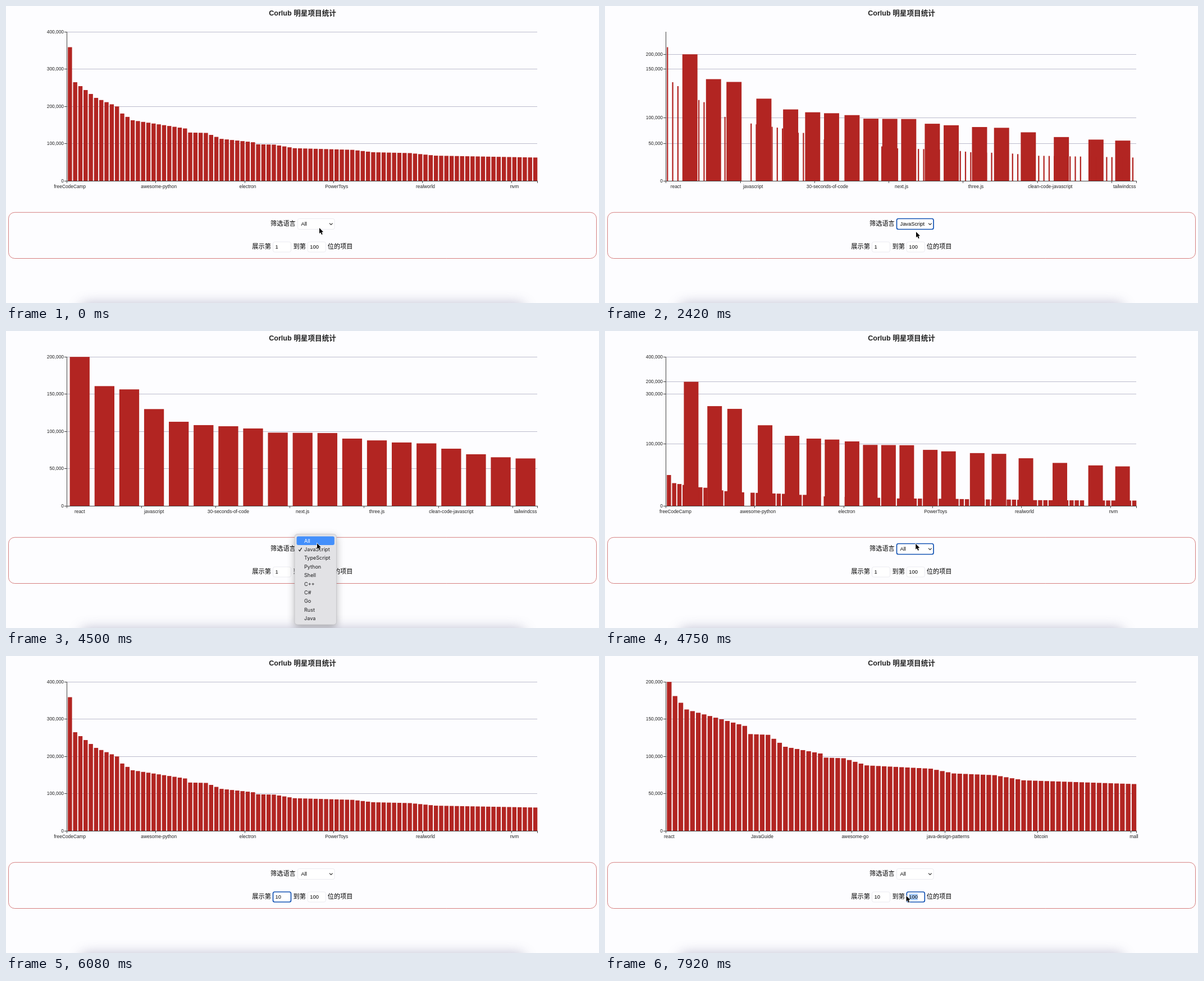
An HTML page with a canvas for the animation above (8000 ms loop, 1056x530 px).

```html
<!DOCTYPE html>
<html lang="zh-CN">
<head>
<meta charset="utf-8">
<style>
  html, body { margin: 0; width: 100%; height: 100%; overflow: hidden; background: #fdfdff; }
  canvas { display: block; }
</style>
</head>
<body>
<canvas id="stage" width="1056" height="530"></canvas>
<script>
const ctx = document.getElementById('stage').getContext('2d');
const LOOP = 8000, LEFT = 109.2, RIGHT = 947.2, TOP = 46.2, BASE = 312.3;
const RED = '#b22522', INK = '#222', AXIS = '#444';
const SANS = '"Liberation Sans", "Noto Sans CJK SC", "Noto Sans CJK", sans-serif';
const CHART_FONT = '8.4px ' + SANS, FORM_FONT = '500 11.2px ' + SANS;
const FIELD_FONT = '9.33px ' + SANS, MENU_FONT = '9.1px Inter, sans-serif';

const clamp = v => Math.max(0, Math.min(1, v));
const lerp = (a, b, p) => a + (b - a) * p;
const cubicOut = p => 1 - (1 - clamp(p)) ** 3;
const expoOut = p => p >= 1 ? 1 : 1 - 2 ** (-10 * clamp(p));
const smooth = p => p * p * (3 - 2 * p);
const within = (t, a, b) => t >= a && t < b;

// Bends of the popularity curve: rank, stars in thousands
const bends = [[0, 359], [1, 265], [5, 223], [9, 200], [10, 181], [12, 163], [22, 141], [23, 130],
  [26, 129], [29, 113], [35, 104], [36, 98.4], [39, 97.6], [43, 88], [54, 83.6], [58, 77.2],
  [65, 74.9], [70, 68], [89, 63]];

function starsAt(rank) {
  const i = bends.findIndex(b => b[0] >= rank);
  if (!i) return bends[0][1];
  const [[r0, s0], [r1, s1]] = bends.slice(i - 1);
  return lerp(s0, s1, (rank - r0) / (r1 - r0));
}

const everyId = Array.from({ length: 90 }, (_, i) => i);
const jsIds = [9, 13, 15, 23, 29, 32, 33, 35, 36, 37, 38, 42, 43, 50, 53, 59, 69, 80, 86];

const all = { ids: everyId, max: 400, every: 17,
  names: ['freeCodeCamp', 'awesome-python', 'electron', 'PowerToys', 'realworld', 'nvm'] };
const js = { ids: jsIds, max: 200, every: 3,
  names: ['react', 'javascript', '30-seconds-of-code', 'next.js', 'three.js', 'clean-code-javascript', 'tailwindcss'] };
const fromTen = { ids: everyId.slice(9), max: 200, every: 16,
  names: ['react', 'JavaGuide', 'awesome-go', 'java-design-patterns', 'bitcoin', 'mall'] };
const views = [
  { start: -LOOP, data: all }, { start: 2322, data: js },
  { start: 4713, data: all }, { start: 6420, data: fromTen }];

const languages = ['All', 'JavaScript', 'TypeScript', 'Python', 'Shell', 'C++', 'C#', 'Go', 'Rust', 'Java'];
const menus = [
  { open: 330, click: 2080, close: 2320, top: 378, height: 149.5, checked: 0, target: 1, scrolls: true },
  { open: 3420, click: 4330, close: 4700, top: 362.5, height: 161.5, checked: 1, target: 0 }];

// Pointer moves: start, duration, x, y
const moves = [
  [1450, 300, 554, 403], [2770, 150, 554, 391], [3690, 310, 554, 379], [4720, 430, 503, 432],
  [6750, 200, 530, 444], [6950, 250, 560, 431], [7310, 270, 541, 431], [7700, 210, 536.5, 428]];

function pointerAt(t) {
  let x = 558, y = 396;
  for (const [start, duration, toX, toY] of moves) {
    const p = smooth(clamp((t - start) / duration));
    x = lerp(x, toX, p);
    y = lerp(y, toY, p);
  }
  return { x, y };
}

function text(str, x, y, font, color = '#000', align = 'left') {
  ctx.font = font;
  ctx.fillStyle = color;
  ctx.textAlign = align;
  ctx.textBaseline = 'middle';
  ctx.fillText(str, x, y);
}

function box(x, y, w, h, r, fill, stroke, width = 1) {
  ctx.beginPath();
  ctx.roundRect(x, y, w, h, r);
  if (fill) { ctx.fillStyle = fill; ctx.fill(); }
  if (stroke) { ctx.strokeStyle = stroke; ctx.lineWidth = width; ctx.stroke(); }
}

function line(points, color, width) {
  ctx.beginPath();
  points.forEach(([x, y]) => ctx.lineTo(x, y));
  ctx.strokeStyle = color;
  ctx.lineWidth = width;
  ctx.stroke();
}

const chevron = (x, y, size, color) =>
  line([[x - size, y - size / 2], [x, y + size / 2], [x + size, y - size / 2]], color, 1.2);

function rule(x, y, w, h, color) {
  ctx.fillStyle = color;
  ctx.fillRect(Math.floor(x - 0.5), Math.floor(y), w, h);
}

const band = data => (RIGHT - LEFT) / data.ids.length;
const valueY = (v, data) => lerp(BASE, TOP, v / data.max);

function barOf(data, id) {
  const i = data.ids.indexOf(id), step = band(data);
  return i < 0 ? null : { x: LEFT + step * (i + 0.1), w: step * 0.8, h: BASE - valueY(starsAt(id), data) };
}

function drawChart(t) {
  const n = views.findLastIndex(v => v.start <= t);
  const { start, data } = views[n], prev = views[n - 1]?.data;
  const move = cubicOut((t - start) / 300), grow = expoOut((t - start) / 1000);

  for (let k = 0; k <= 4; k++) {
    const v = data.max / 4 * k;
    const kept = prev && v <= prev.max && v % (prev.max / 4) === 0;
    const y = lerp(valueY(v, kept ? prev : data), valueY(v, data), move);
    if (k) rule(LEFT, y, RIGHT - LEFT, 1, '#bcbccd');
    rule(105, y, 4, 1, AXIS);
    text((v * 1000).toLocaleString('en-US'), 103, y, CHART_FONT, INK, 'right');
  }

  // Kept bars travel, new ones rise, dropped ones narrow to nothing
  ctx.fillStyle = RED;
  for (const id of everyId) {
    const a = prev && barOf(prev, id), b = barOf(data, id);
    if (!a && !b) continue;
    let { x, w, h } = b || a;
    if (a && b) {
      x = lerp(a.x, x, move);
      w = lerp(a.w, w, move);
      h = lerp(a.h, h, move);
    } else if (b) h *= grow;
    else w *= 1 - move;
    ctx.fillRect(x, BASE - h, w, h);
  }

  rule(LEFT, TOP, 1, BASE - TOP, AXIS);
  rule(LEFT, BASE, RIGHT - LEFT, 1, AXIS);
  rule(RIGHT, BASE, 1, 4, AXIS);
  data.names.forEach((name, i) => {
    const tick = LEFT + band(data) * data.every * i;
    const from = band(i || !prev ? data : prev);
    rule(tick, BASE, 1, 4, AXIS);
    text(name, tick + lerp(from, band(data), move) / 2, 322.3, CHART_FONT, INK, 'center');
  });
}

function field(x, y, w, h, focused) {
  box(x, y, w, h, 3, '#fff', focused ? '#1554b4' : '#e6e6ec', focused ? 1.7 : 0.8);
}

function drawForm(t, pointer) {
  box(4.5, 368.3, 1047, 82.2, 11, null, 'rgba(186,40,38,.66)', 0.9);
  text('筛选语言', 471, 388.5, FORM_FONT);
  text('展示第', 438.3, 429.5, FORM_FONT);
  text('到第', 511.5, 429.5, FORM_FONT);
  text('位的项目', 572.8, 429.5, FORM_FONT);

  field(519.5, 379.5, 65.5, 19, within(t, 2250, 5650));
  text(within(t, 2250, 4650) ? 'JavaScript' : 'All', 525.5, 389.5, FIELD_FONT);
  chevron(578.8, 389.1, 2.8, '#333');

  field(475.5, 421, 32, 18, within(t, 5650, 7250));
  text(t < 6000 ? '1' : '10', 479.5, 430.5, FIELD_FONT);

  field(537.3, 421, 32, 18, t >= 7250);
  const digit = 5.2, selected = t < 7310 ? 0 : Math.min(3, Math.round((557 - pointer.x) / digit));
  if (selected > 0) box(556.9 - selected * digit, 424, selected * digit, 12, 0, '#acd0fa');
  text('100', 541.3, 430.5, FIELD_FONT);
}

function drawMenu(t, pointer) {
  const menu = menus.find(m => within(t, m.open, m.close));
  if (!menu) return;
  const { top, height, scrolls, click } = menu, row = 15.4;
  const hover = Math.max(0, Math.floor((pointer.y - top - 4) / row));
  const lit = t < click ? hover : t < click + 85 ? -1 : menu.target;

  ctx.save();
  ctx.globalAlpha = clamp((menu.close - t) / 90);
  ctx.shadowColor = 'rgba(0,0,0,.3)';
  ctx.shadowBlur = 14;
  ctx.shadowOffsetY = 4;
  box(514, top, 74.5, height, 5, '#e2e2e5');
  ctx.shadowColor = 'transparent';
  box(514, top, 74.5, height, 5, null, '#bcbcc0', 0.6);

  ctx.save();
  ctx.beginPath();
  ctx.rect(514, top, 75, height - (scrolls ? 14 : 0));
  ctx.clip();
  languages.forEach((name, i) => {
    const y = top + 12 + i * row, color = i === lit ? '#fff' : '#1c1c1e';
    if (i === lit) box(517.5, y - 8, 67.3, 15.5, 3, '#438ffb');
    if (i === menu.checked) line([[521.2, y + 0.5], [523, y + 2.8], [526.6, y - 3]], color, 1.2);
    text(name, 531, y + 0.3, MENU_FONT, color);
  });
  ctx.restore();
  if (scrolls) chevron(550.3, top + height - 8, 3, INK);
  ctx.restore();
}

function drawPointer(t, { x, y }) {
  if (within(t, 6000, 6750)) return; // hidden while typing
  const overField = within(y, 421, 439) && (within(x, 475, 508) || within(x, 538, 570));
  ctx.save();
  ctx.translate(x, y);
  if (overField) {
    line([[0, -4.5], [0, 4.5]], INK, 1);
    for (const s of [-1, 1]) line([[-2.2, 5.6 * s], [0, 4.4 * s], [2.2, 5.6 * s]], INK, 1);
  } else {
    const arrow = new Path2D('M0 0V10L2.3 8 4 12 5.7 11.3 4.1 7.4 7.1 7.2Z');
    ctx.lineWidth = 1.3;
    ctx.strokeStyle = '#fff';
    ctx.stroke(arrow);
    ctx.fillStyle = '#000';
    ctx.fill(arrow);
  }
  ctx.restore();
}

function drawBottomShadow() {
  ctx.save();
  ctx.shadowColor = 'rgba(70,70,120,.36)';
  ctx.shadowBlur = 22;
  box(133, 531, 790, 60, 10, '#ccc');
  ctx.restore();
}

function frame() {
  const t = performance.now() % LOOP, pointer = pointerAt(t);
  ctx.fillStyle = '#fdfdff';
  ctx.fillRect(0, 0, 1056, 530);
  text('Corlub 明星项目统计', 528, 13.5, 'bold 12.6px ' + SANS, INK, 'center');
  drawChart(t);
  drawForm(t, pointer);
  drawBottomShadow();
  drawMenu(t, pointer);
  drawPointer(t, pointer);
  requestAnimationFrame(frame);
}
frame();
</script>
</body>
</html>
```
